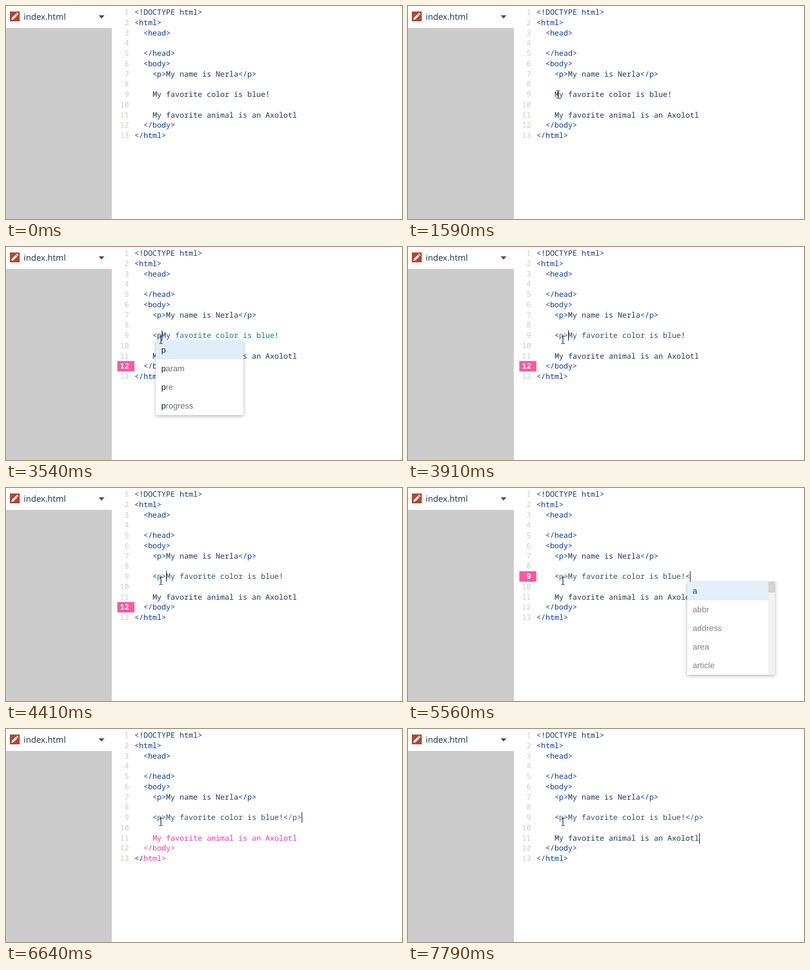
Animation of 722x389 px, one loop 8000 ms. Source, as an HTML page:

```html
<!DOCTYPE html>
<html lang="en">
<head>
<meta charset="utf-8">
<title>Closing a paragraph tag</title>
<style>
  html, body { margin: 0; width: 100%; height: 100%; overflow: hidden; background: #fff; }
  svg { display: block; width: 100vw; height: 100vh; }
  text { white-space: pre; text-rendering: geometricPrecision; }
  .code text { font: 13.72px "Noto Sans Mono", "DejaVu Sans Mono", monospace; }
  .title { font: 15.5px "Open Sans", "Noto Sans", sans-serif; fill: #16324f; }
  .menu text { font: 15px "Liberation Sans", Arial, sans-serif; }
  .num { fill: #cbcbc5; }
  .doc { fill: #173a72; }
  .tag { fill: #0a3c9c; }
  .txt { fill: #1d3a60; }
  .soft { fill: #2c566e; }
  .dim { fill: #4f7088; }
  .attr { fill: #0b857c; }
  .err { fill: #f43ca2; }
</style>
</head>
<body>
<svg viewBox="0 0 722 389" preserveAspectRatio="none">
  <rect width="722" height="389" fill="#fff"/>
  <rect y="40" width="193" height="349" fill="#ccc"/>
  <rect x="7" y="10" width="18" height="18" fill="#ae4a30"/>
  <path d="M9.8 25.2l1-3.8 7-7 2.8 2.8-7 7zM18.6 13.6l1-1q.8-.6 1.5 0l1.3 1.3q.6.7 0 1.5l-1 1z" fill="#fff"/>
  <text class="title" x="32.3" y="25">index.html</text>
  <path d="M169 17h10.4l-5.2 6z" fill="#733a63"/>
  <g class="code" id="code"></g>
  <rect id="caret" width="1" height="19" fill="#000"/>
  <g class="menu" id="menu"></g>
  <path id="mouse" d="M-3 -6.5h2.4M.6 -6.5h2.4M0 -6v13M-3 7.5h2.4M.6 7.5h2.4" fill="none" stroke="#000" stroke-width="1.1"/>
</svg>
<script>
const LOOP = 8000, X0 = 234.2, CW = 8.232, LH = 18.75;
const $ = id => document.getElementById(id);
const colX = c => X0 + c * CW;
const topY = n => 2 + (n - 1) * LH;
const esc = s => s.replace(/&/g, "&amp;").replace(/</g, "&lt;");
const rect = (x, y, w, h, fill, more = "") =>
  `<rect x="${x}" y="${y}" width="${w}" height="${h}" fill="${fill}" ${more}/>`;

// Each row: indent, then pairs of class and text.
const base = [
  [0, "doc", "<!DOCTYPE html>"],
  [0, "tag", "<html>"],
  [2, "tag", "<head>"],
  [0],
  [2, "tag", "</head>"],
  [2, "tag", "<body>"],
  [4, "tag", "<p>", "txt", "My name is Nerla", "tag", "</p>"],
  [0],
  [0],
  [0],
  [4, "txt", "My favorite animal is an Axolotl"],
  [2, "tag", "</body>"],
  [0, "tag", "</html>"]
];
const errRows = {
  11: [4, "err", "My favorite animal is an Axolotl"],
  12: [2, "err", "</body>"],
  13: [0, "tag", "</", "err", "html>"]
};

function edited(open, close) {
  if (open === "") return [4, "txt", "My favorite color is blue!"];
  if (open !== "<p>") return [4, "tag", open + "My", "attr", " favorite color is blue!"];
  return [4, "tag", "<", "dim", "p", "soft", ">My favorite color is blue!",
    "tag", close.slice(0, 1), "dim", close.slice(1, 2), "soft", close.slice(2)];
}

// Changes of state; caret is [line, column] or null.
const steps = [
  [0, { open: "", close: "", caret: null, mark: 0, err: false, menu: "" }],
  [1890, { caret: [9, 4] }],
  [2390, { caret: null }],
  [2890, { caret: [9, 4] }],
  [3260, { open: "<", caret: [9, 5] }],
  [3330, { menu: "all", menuX: 270, mark: 12 }],
  [3540, { open: "<p", caret: [9, 6], menu: "p", menuX: 273 }],
  [3910, { open: "<p>", caret: [9, 7], menu: "" }],
  [3980, { err: true }],
  [4410, { err: false }],
  [4560, { caret: null }],
  [4930, { caret: [9, 33] }],
  [5430, { close: "<", caret: [9, 34] }],
  [5500, { menu: "all", menuX: 509, mark: 9 }],
  [5770, { close: "</", caret: [9, 35], menu: "" }],
  [6130, { close: "</p", caret: [9, 36], mark: 11 }],
  [6500, { err: true }],
  [6640, { close: "</p>", caret: [9, 37], mark: 0 }],
  [7070, { err: false }],
  [7220, { caret: null }],
  [7500, { caret: [10, 4] }],
  [7790, { caret: [11, 36] }]
];
const lists = {
  all: ["a", "abbr", "address", "area", "article"],
  p: ["p", "param", "pre", "progress"]
};

function rowSvg([indent, ...parts], n, mark) {
  const y = topY(n) + 14;
  let col = indent, out = "";
  if (mark) out += rect(203, topY(n), 31, 19, "#ff5a9b");
  out += `<text x="224.3" y="${y}" text-anchor="end" ${mark
    ? 'fill="#fff" font-weight="700" style="font-weight:700"' : 'class="num"'}>${n}</text>`;
  for (let i = 0; i < parts.length; i += 2) {
    out += `<text class="${parts[i]}" x="${colX(col)}" y="${y}">${esc(parts[i + 1])}</text>`;
    col += parts[i + 1].length;
  }
  return out;
}

function menuSvg(kind, x) {
  if (!kind) return "";
  const items = lists[kind], all = kind === "all", h = all ? 170 : 136;
  let out = rect(x, 171, 160, h, "#fff", 'style="filter:drop-shadow(0 2px 3px rgba(0,0,0,.3))"');
  out += rect(x, 171, all ? 148 : 160, 34, all ? "#e3f0fa" : "#dfeefa");
  if (all) out += rect(x + 148, 171, 12, h, "#f2f2f2") + rect(x + 148, 171, 12, 20, "#d2d2d2");
  items.forEach((word, i) => {
    const hit = all ? 0 : 1;
    const rest = all ? (i ? "#8b7f80" : "#2d3440") : "#6c7074";
    out += `<text x="${x + 10}" y="${193 + i * 34}" fill="${rest}">` +
      `<tspan fill="#1d222b">${word.slice(0, hit)}</tspan>${word.slice(hit)}</text>`;
  });
  return out;
}

// Pointer: a stepped, easing glide, then small hops.
const hops = [[870, 263, 160], [940, 272, 160], [1590, 273, 161],
  [1740, 260, 156], [1815, 272, 163], [1890, 282, 169]];
function pointer(t) {
  if (t < 70) return null;
  const k = Math.min(1, Math.floor((t - 70) / 72.2) / 9);
  const e = 1 - (1 - k) ** 2;
  let p = [Math.round(466 - 212 * e), Math.round(334 - 173 * e)];
  for (const [at, x, y] of hops) if (t >= at) p = [x, y];
  return p;
}

let last = -1;
function draw(t) {
  const p = pointer(t);
  $("mouse").style.display = p ? "" : "none";
  if (p) $("mouse").setAttribute("transform", `translate(${p[0] + .5} ${p[1]})`);

  const now = steps.filter(s => s[0] <= t);
  if (now.length === last) return;
  last = now.length;
  const s = Object.assign({}, ...now.map(x => x[1]));
  $("code").innerHTML = base.map((row, i) => {
    const n = i + 1;
    const r = n === 9 ? edited(s.open, s.close) : s.err && errRows[n] || row;
    return rowSvg(r, n, s.mark === n);
  }).join("");
  $("menu").innerHTML = menuSvg(s.menu, s.menuX);
  $("caret").style.display = s.caret ? "" : "none";
  if (s.caret) {
    $("caret").setAttribute("x", Math.round(colX(s.caret[1])));
    $("caret").setAttribute("y", Math.round(topY(s.caret[0])));
  }
}

const start = performance.now();
function tick() {
  draw((performance.now() - start) % LOOP);
  requestAnimationFrame(tick);
}
tick();
</script>
</body>
</html>
```
